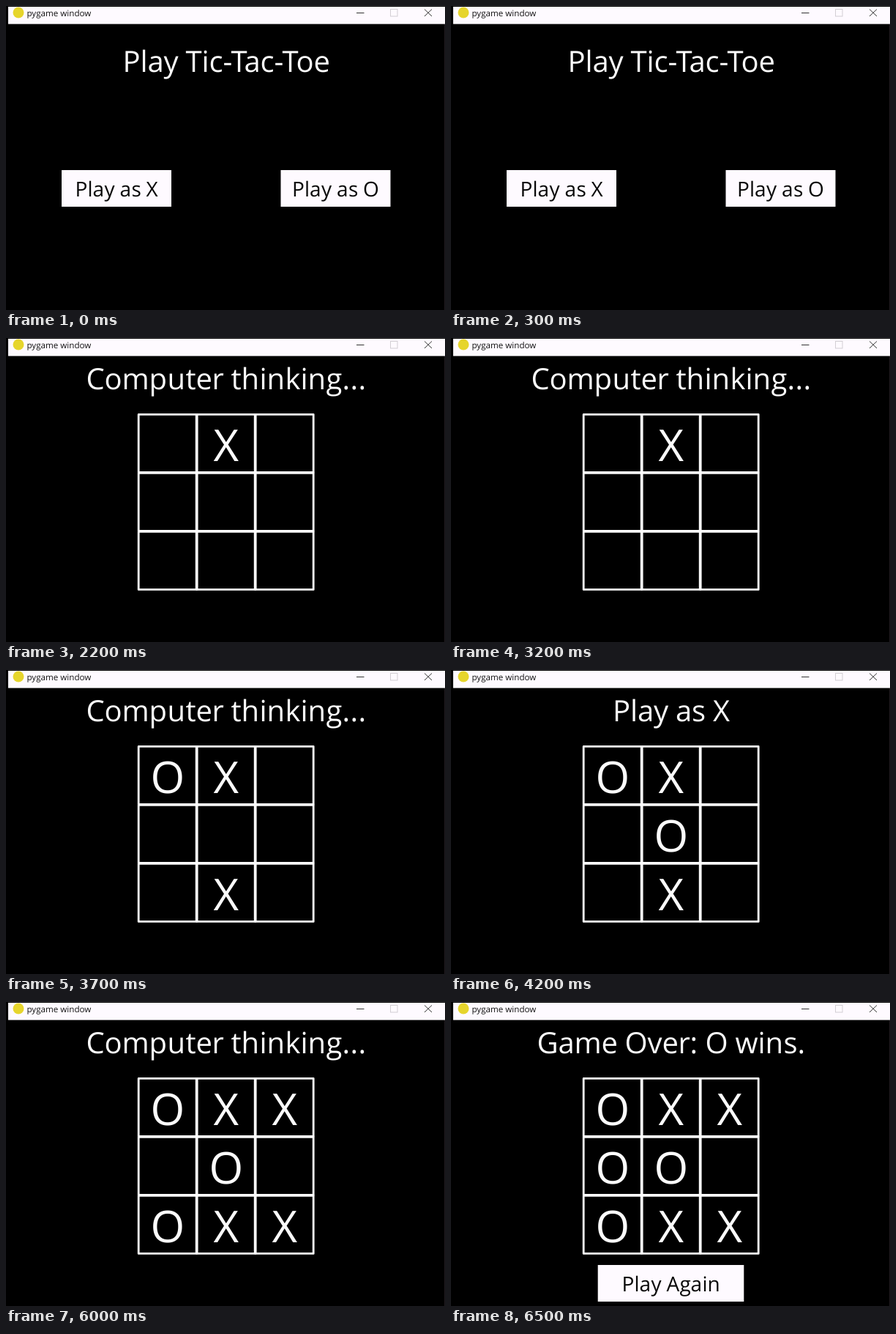
An HTML page that plays this animation: 600x415 px, repeating every 8000 ms.

```html
<!DOCTYPE html>
<html lang="en">
<head>
<meta charset="utf-8">
<title>Tic-Tac-Toe</title>
<style>
  html, body { margin: 0; width: 100%; height: 100%; overflow: hidden; background: #000; }
  svg { display: block; width: 600px; height: 415px; }
  text { font-family: "Open Sans", "Noto Sans", sans-serif; fill: #fcfcfc; text-rendering: geometricPrecision; }
  .button rect { fill: #fefaff; }
  .button text { fill: #080808; }
  .bar text { font-size: 11.6px; fill: #111; }
</style>
</head>
<body>
<svg id="stage" viewBox="0 0 600 415">
  <rect width="600" height="415"/>
  <rect x="599" y="25" width="1" height="390" fill="#1e181d"/>
  <g class="bar" fill="none" stroke="#333">
    <rect x="3" y="1" width="597" height="23.600" fill="#fefaff" stroke="none"/>
    <circle cx="17" cy="9" r="7.5" fill="#e6d52c" stroke="none"/>
    <text x="28.5" y="14" stroke="none">pygame window</text>
    <path d="M479 9.5H489.500"/>
    <rect x="525.500" y="4.500" width="9.500" height="9.500" stroke="#d2ced3"/>
    <path d="M572 4.500L582 14M582 4.500L572 14"/>
  </g>
</svg>
<script>
const LOOP = 8000, TILE = 80, LEFT = 181, TOP = 104;
const THINKING = "Computer thinking...", TURN = "Play as X";

// Start time, heading, and the mark placed as [player, row, column].
const steps = [
  [0, "Play Tic-Tac-Toe"],
  [1400, TURN],
  [2200, THINKING, ["X", 0, 1]],
  [3300, TURN, ["O", 0, 0]],
  [3700, THINKING, ["X", 2, 1]],
  [4200, TURN, ["O", 1, 1]],
  [5100, THINKING, ["X", 2, 2]],
  [5500, TURN, ["O", 2, 0]],
  [6000, THINKING, ["X", 0, 2]],
  [6500, "Game Over: O wins.", ["O", 1, 0]]
];

const stage = document.getElementById("stage");
const pen = document.createElement("canvas").getContext("2d");

function add(parent, tag, attrs, content = "") {
  const el = document.createElementNS("http://www.w3.org/2000/svg", tag);
  for (const key in attrs) el.setAttribute(key, attrs[key]);
  el.textContent = content;
  return parent.appendChild(el);
}

// Centred text with whole-pixel advances and kerning, as SDL lays it out.
function addText(parent, cx, y, size, content) {
  pen.font = `${size}px "Open Sans", "Noto Sans", sans-serif`;
  pen.textRendering = "geometricPrecision";
  const measure = s => pen.measureText(s).width;
  const offsets = [0];
  [...content].forEach((char, i) => {
    const next = content[i + 1] || "";
    const kern = next ? measure(char + next) - measure(char) - measure(next) : 0;
    offsets.push(offsets[i] + Math.round(measure(char)) + Math.floor(kern + 0.01));
  });
  const left = cx - offsets.pop() / 2;
  const x = offsets.map(offset => left + offset).join(" ");
  return add(parent, "text", { x, y, "font-size": size }, content);
}

function addButton(parent, x, y, width, label) {
  const g = add(parent, "g", { class: "button" });
  add(g, "rect", { x, y, width, height: 50 });
  addText(g, x + width / 2, y + 36, 28, label);
  return g;
}

const menu = add(stage, "g");
addButton(menu, 76, 224, 150, "Play as X");
addButton(menu, 375.5, 224, 150, "Play as O");

const board = add(stage, "g");
for (let i = 0; i < 9; i++) {
  add(board, "rect", {
    x: LEFT + (i % 3) * TILE + 0.2,
    y: TOP + Math.floor(i / 3) * TILE + 0.4,
    width: TILE - 1, height: TILE - 1,
    fill: "none", stroke: "#fcfcfc", "stroke-width": 2.8, "stroke-linejoin": "round"
  });
}

const scenes = steps.map(([start, label, mark], i) => {
  const heading = addText(stage, 301, i ? 70.4 : 90.4, 40, label);
  if (!mark) return { start, heading };
  const [player, row, col] = mark;
  const x = LEFT + (col + 0.5) * TILE, y = TOP + row * TILE + 64;
  return { start, heading, mark: addText(board, x, y, 60, player) };
});

const again = addButton(stage, 200.7, 359, 199.600, "Play Again");

function show(el, on) {
  el.style.display = on ? "" : "none";
}

function draw(now) {
  const t = now % LOOP;
  const current = scenes.findLastIndex(scene => scene.start <= t);
  show(menu, current === 0);
  show(board, current > 0);
  show(again, current === scenes.length - 1);
  scenes.forEach(({ heading, mark }, i) => {
    show(heading, i === current);
    if (mark) show(mark, i <= current);
  });
}

function tick() {
  draw(performance.now());
  requestAnimationFrame(tick);
}
tick();
</script>
</body>
</html>
```
